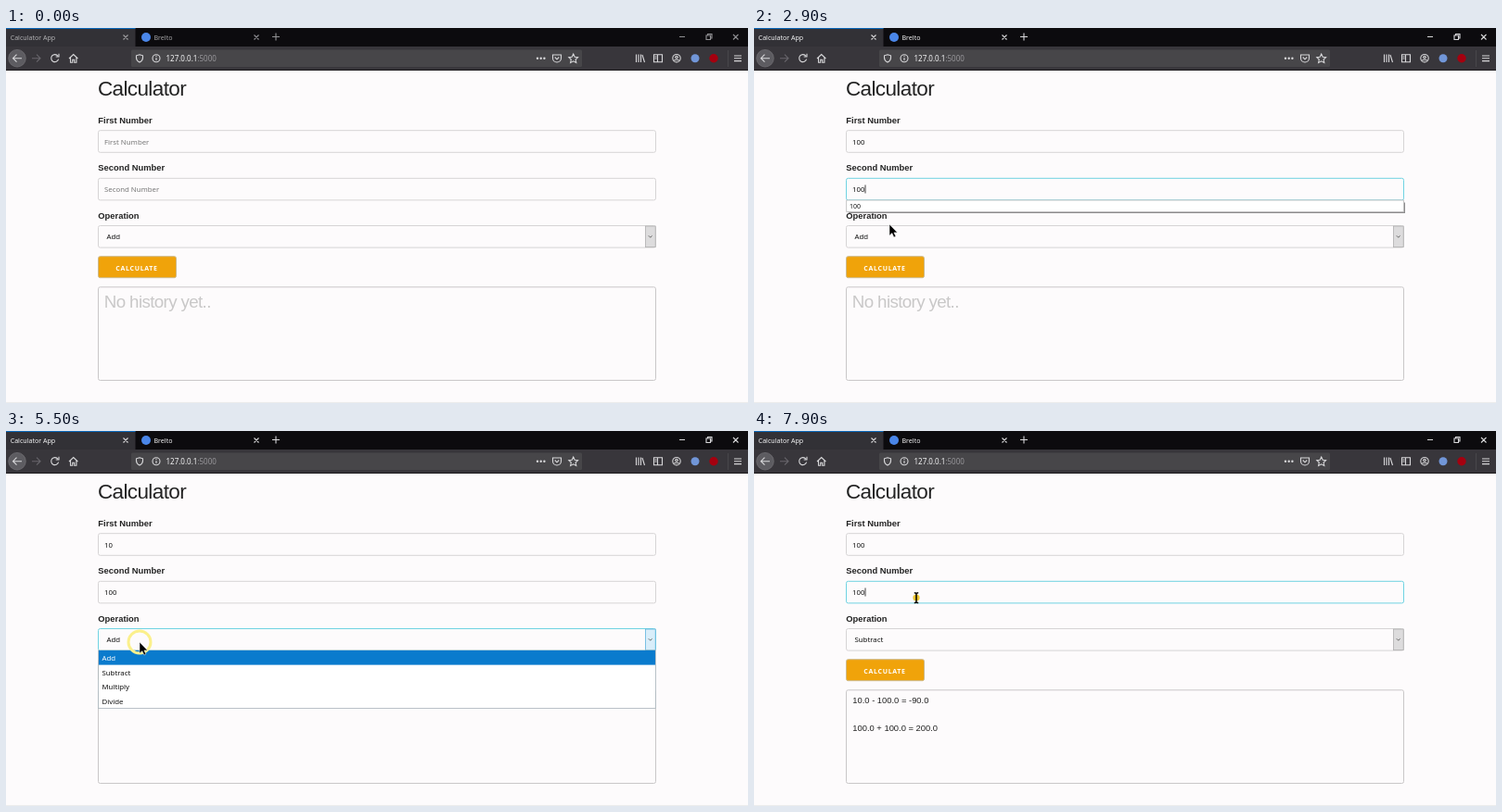
Recreate the animation shown at these times as an HTML page. Size 800x405 px, loop 8 s.

```html
<!DOCTYPE html>
<html lang="en">
<head>
<meta charset="utf-8">
<title>Calculator App</title>
<style>
  html, body { margin: 0; width: 100%; height: 100%; overflow: hidden; background: #fdfbfc; }
  svg { display: block; width: 800px; height: 405px; }
  text { font: 7.8px "Noto Sans", sans-serif; fill: #111; white-space: pre; }
  .arial { font: 9.4px "Liberation Sans", Arial, sans-serif; fill: #222; }
  .label { font-weight: bold; }
  .title { font-size: 22.5px; letter-spacing: -.63px; }
  .empty { font-size: 18.75px; letter-spacing: -.63px; fill: #c9c8c8; }
  .ui { font-size: 7.05px; fill: #f4f4f5; }
  .url { font-size: 8px; fill: #f4f4f5; }
  .button { font-size: 7px; font-weight: bold; letter-spacing: .7px; fill: #fff; }
  .small { font-size: 7px; }
  .field { fill: #fdfbfc; stroke: #d6d4d5; }
  .icon { fill: none; stroke: #d8d8da; stroke-width: 1.1; }
  .dim { opacity: .65; }
</style>
</head>
<body>
<svg viewBox="0 0 800 405">
  <rect width="800" height="405" fill="#fdfbfc"/>
  <rect y="404" width="800" height="1" fill="#ececec"/>

  <!-- browser window -->
  <rect width="800" height="21" fill="#0c0b0e"/>
  <rect width="139.5" height="21" fill="#323136"/>
  <rect width="139.5" height="1" fill="#0a66b8"/>
  <rect y="20" width="800" height="26" fill="#38363b"/>
  <rect y="45" width="800" height="1" fill="#1b1a1d"/>
  <rect x="135" y="23.5" width="486" height="18.5" rx="1.5" fill="#474649"/>
  <g id="tabs">
    <text class="ui" x="4.7" y="12.7">Calculator App</text>
    <text class="ui" x="159.5" y="12.7">Brelto</text>
    <path class="icon" d="M126.5 7.5l5 5m0-5l-5 5M267.500 7.500l5 5m0-5l-5 5M291 5.500v8m-4-4h8"/>
    <path class="icon" d="M726 9.500h6M755 8h4.500v4.500H755zM756.500 8V6.500H761V11h-1.500M784 7l5.500 5.500m0-5.500L784 12.500" stroke-width=".9"/>
  </g>
  <circle cx="151" cy="10" r="5" fill="#4a86e8"/>
  <circle cx="12" cy="32.700" r="9.300" fill="#5d5c61" stroke="#747378" stroke-width=".7"/>
  <path class="icon" d="M17 32.700H7.500m4-4l-4 4 4 4" stroke-width="1.400"/>
  <path class="icon" d="M28 32.700h9m-4-4l4 4-4 4" style="stroke:#68666c"/>
  <path class="icon" d="M56 30.300a4 4 0 1 0 .6 3.400M57 27.800v3.200h-3.300"/>
  <path class="icon" d="M68 33l4.700-4.500L77.400 33M69.500 32v5.200h2.200v-3h2v3h2.200V32"/>
  <path class="icon" d="M144 28.800l3.500 1v2.400q0 3-3.500 4.800-3.500-1.800-3.500-4.800v-2.400z"/>
  <g class="icon"><circle cx="162" cy="32.700" r="4"/><path d="M162 32v3m0-5v1"/></g>
  <text class="url" x="172.500" y="36">127.0.0.1<tspan fill="#98979b">:5000</tspan></text>
  <g fill="#d8d8da"><circle cx="573" cy="32.700" r="1.200"/><circle cx="576.700" cy="32.700" r="1.200"/><circle cx="580.400" cy="32.700" r="1.200"/></g>
  <path class="icon" d="M589.500 29h9v3.500a4.500 4.500 0 0 1-9 0zM591.700 31.500l2.300 2.300 2.300-2.300"/>
  <path class="icon" d="M611.700 28l1.500 3.200 3.400.4-2.500 2.400.7 3.500-3.100-1.700-3.100 1.700.7-3.500-2.500-2.400 3.400-.4z"/>
  <path class="icon" d="M679.500 28.500v8.500M682 28.500v8.500M684.500 28.500v8.500M686 29l2.500 8"/>
  <path class="icon" d="M698.500 28.700h9v8h-9zM702.500 28.700v8M699.500 31h2m-2 2h2"/>
  <g class="icon"><circle cx="723" cy="32.700" r="4.200"/><circle cx="723" cy="31.500" r="1.300"/><path d="M720 35.300q3-2 6 0"/></g>
  <circle cx="743" cy="32.700" r="4.500" fill="#7196d8"/>
  <circle cx="763" cy="32.700" r="4.700" fill="#a5000f"/>
  <path class="icon" d="M785 30h8m-8 2.800h8m-8 2.800h8"/>
  <path d="M778.500 24v18" stroke="#504f54" stroke-width=".7"/>

  <!-- page -->
  <text class="arial title" x="99" y="73">Calculator</text>
  <text class="arial label" x="99.300" y="103">First Number</text>
  <text class="arial label" x="99.300" y="154.400">Second Number</text>
  <text class="arial label" x="99.300" y="205.800">Operation</text>
  <rect class="field" id="firstBox" x="99.500" y="110.700" width="601" height="23.600" rx="2"/>
  <rect class="field" id="secondBox" x="99.500" y="162.300" width="601" height="23.600" rx="2"/>
  <rect class="field" id="selectBox" x="99.500" y="213.500" width="601" height="23.600" rx="2"/>
  <rect id="selectButton" x="689.500" y="214" width="10.700" height="22.600" stroke-width=".8"/>
  <path d="M692.800 224.300l1.900 1.900 1.900-1.900" fill="none" stroke="#555" stroke-width=".9"/>
  <text id="firstText" x="106" y="125.600"></text>
  <text id="secondText" x="106" y="177"></text>
  <text id="selectText" x="108.500" y="228.300"></text>
  <path id="caret" stroke="#111" stroke-width=".8"/>
  <rect id="calculate" x="99.500" y="246.700" width="84" height="23" rx="2" fill="#f0a30a"/>
  <text class="button" x="118.300" y="261.800">CALCULATE</text>
  <rect class="field" x="99.500" y="279.800" width="601" height="100.700" rx="2" style="stroke:#c9c7c8"/>
  <text class="arial empty" id="empty" x="105.800" y="302">No history yet..</text>
  <text class="arial" id="line1" x="106.300" y="293.800"></text>
  <text class="arial" id="line2" x="106.300" y="324.300"></text>

  <g id="popup">
    <path d="M102 147.700h599.200V137" fill="none" stroke="#8d8c8d" stroke-width="1.600"/>
    <rect x="99.700" y="134.500" width="600.800" height="12.400" fill="#fff" stroke="#b9b8b9" stroke-width=".8"/>
    <text class="small" x="103" y="143.500">100</text>
  </g>
  <g id="menu"></g>

  <g id="mouse">
    <circle id="ring"/>
    <path id="arrow" d="M0 0V12.200L2.800 9.600 4.900 14 6.900 13 4.900 8.900H8.600Z" fill="#000" stroke="#fff" stroke-width=".5"/>
    <path id="beam" d="M-2.200-5.200Q0-5.200 0-4.200 0-5.200 2.200-5.200M0-4.500V4.800M-2.200 5.400Q0 5.400 0 4.400 0 5.400 2.200 5.400" fill="none" stroke="#000" stroke-width="1.500"/>
  </g>
</svg>
<script>
const LOOP = 8000, STEP = 100;
const $ = id => document.getElementById(id);
const show = (id, visible) => $(id).setAttribute('visibility', visible ? 'inherit' : 'hidden');
const set = (id, attrs) => { for (const k in attrs) $(id).setAttribute(k, attrs[k]); };

// Each entry is [start time, value].
const first = [[0, ''], [1300, '1'], [1500, '10'], [1600, '100'], [4700, '10'], [7200, '100']];
const second = [[0, ''], [2500, '1'], [2600, '10'], [2700, '100']];
const focus = [[0, ''], [800, 'first'], [2300, 'second'], [3300, 'button'], [4200, 'first'],
  [5300, 'select'], [6300, 'button'], [7000, 'first'], [7900, 'second']];
const suggestions = [[0, ''], [1300, 'first'], [2300, ''], [2500, 'second'], [3300, ''],
  [4700, 'first'], [5300, ''], [7200, 'first'], [7900, '']];
const history = [[0, []], [3700, ['100.0 + 100.0 = 200.0']],
  [6700, ['10.0 - 100.0 = -90.0', '100.0 + 100.0 = 200.0']]];
const clicks = [800, 2300, 3300, 4200, 5300, 5900, 6300, 7000, 7900];
const path = [[100, 505, 391], [600, 155, 121], [1800, 155, 121], [2100, 168, 190], [2300, 172, 182],
  [2800, 172, 182], [2900, 146, 212], [3300, 143, 258], [3700, 143, 258], [4100, 156, 117],
  [4800, 156, 117], [5300, 144, 228], [5500, 144, 228], [5700, 146, 264], [5900, 146, 264],
  [6300, 143, 258], [6600, 143, 258], [6700, 158, 145], [6900, 162, 126], [7400, 162, 126],
  [7700, 172, 190], [7900, 175, 180]];
const options = ['Add', 'Subtract', 'Multiply', 'Divide'];
const ROW = 15.6;

const valueAt = (track, t) => track.filter(e => e[0] <= t).pop()[1];

function mouseAt(t) {
  const i = path.findIndex(p => p[0] > t);
  if (i < 0) return path[path.length - 1].slice(1);
  if (i === 0) return [505, 430];
  const [t0, x0, y0] = path[i - 1], [t1, x1, y1] = path[i];
  const u = (t - t0) / (t1 - t0), k = u * u * (3 - 2 * u);
  return [x0 + (x1 - x0) * k, y0 + (y1 - y0) * k];
}

$('menu').innerHTML = '<rect x="99.5" y="237" width="601" height="62.5" fill="#fff" stroke="#a9b4bb" stroke-width=".8"/>' +
  `<rect id="highlight" x="100" width="600" height="${ROW}" fill="#0a7bcd"/>` +
  options.map((name, i) => `<text id="option${i}" x="103.500" y="${248 + i * ROW}">${name}</text>`).join('');

function drawMouse(t) {
  const [x, y] = mouseAt(t);
  const inside = (top, bottom) => y > top && y < bottom;
  const overText = x > 99 && x < 701 && (inside(110, 135) || inside(162, 186) || inside(280, 381));
  set('mouse', { transform: `translate(${x} ${y})` });
  show('arrow', !overText);
  show('beam', overText);
  const age = t - clicks.filter(c => c <= t).pop();
  show('ring', age < 400);
  if (age < STEP) set('ring', { r: 3.6, fill: '#ecc62f', stroke: 'none' });
  else set('ring', { r: age < 200 ? 8 : 12, fill: 'none', stroke: '#fbf08c', 'stroke-width': 3 });
}

function draw(t) {
  const texts = { first: valueAt(first, t), second: valueAt(second, t) };
  const focused = valueAt(focus, t), popup = valueAt(suggestions, t), lines = valueAt(history, t);
  $('tabs').setAttribute('class', t < 800 ? 'dim' : '');

  for (const name of ['first', 'second']) {
    $(name + 'Text').textContent = texts[name] || (name === 'first' ? 'First Number' : 'Second Number');
    $(name + 'Text').style.fill = texts[name] ? '#111' : '#777';
  }
  for (const name of ['first', 'second', 'select'])
    $(name + 'Box').style.stroke = focused === name ? '#70d3e2' : '#d6d4d5';

  const inField = focused in texts;
  show('caret', inField);
  if (inField) {
    const x = 106.6 + texts[focused].length * 4.47;
    set('caret', { d: `M${x} ${focused === 'first' ? 118 : 169.500}v9` });
  }
  show('popup', popup);
  set('popup', { transform: `translate(0 ${popup === 'second' ? 51.5 : 0})` });

  const open = t >= 5400 && t < 5900, row = t < 5700 ? 0 : 1;
  show('menu', open);
  set('highlight', { y: 237 + row * ROW });
  options.forEach((_, i) => { $('option' + i).style.fill = i === row ? '#fff' : '#111'; });
  $('selectText').textContent = options[t < 5900 ? 0 : 1];
  set('selectButton', open ? { fill: '#d9eefa', stroke: '#5fb4dc' } : { fill: '#dddcdd', stroke: '#b0afb0' });
  set('calculate', { stroke: focused === 'button' ? '#9a9a8c' : '#cdb988' });

  show('empty', !lines.length);
  $('line1').textContent = lines[0] || '';
  $('line2').textContent = lines[1] || '';
  drawMouse(t);
}

const start = performance.now();
function tick() {
  draw(Math.floor((performance.now() - start) % LOOP / STEP) * STEP);
  requestAnimationFrame(tick);
}
tick();
</script>
</body>
</html>
```
